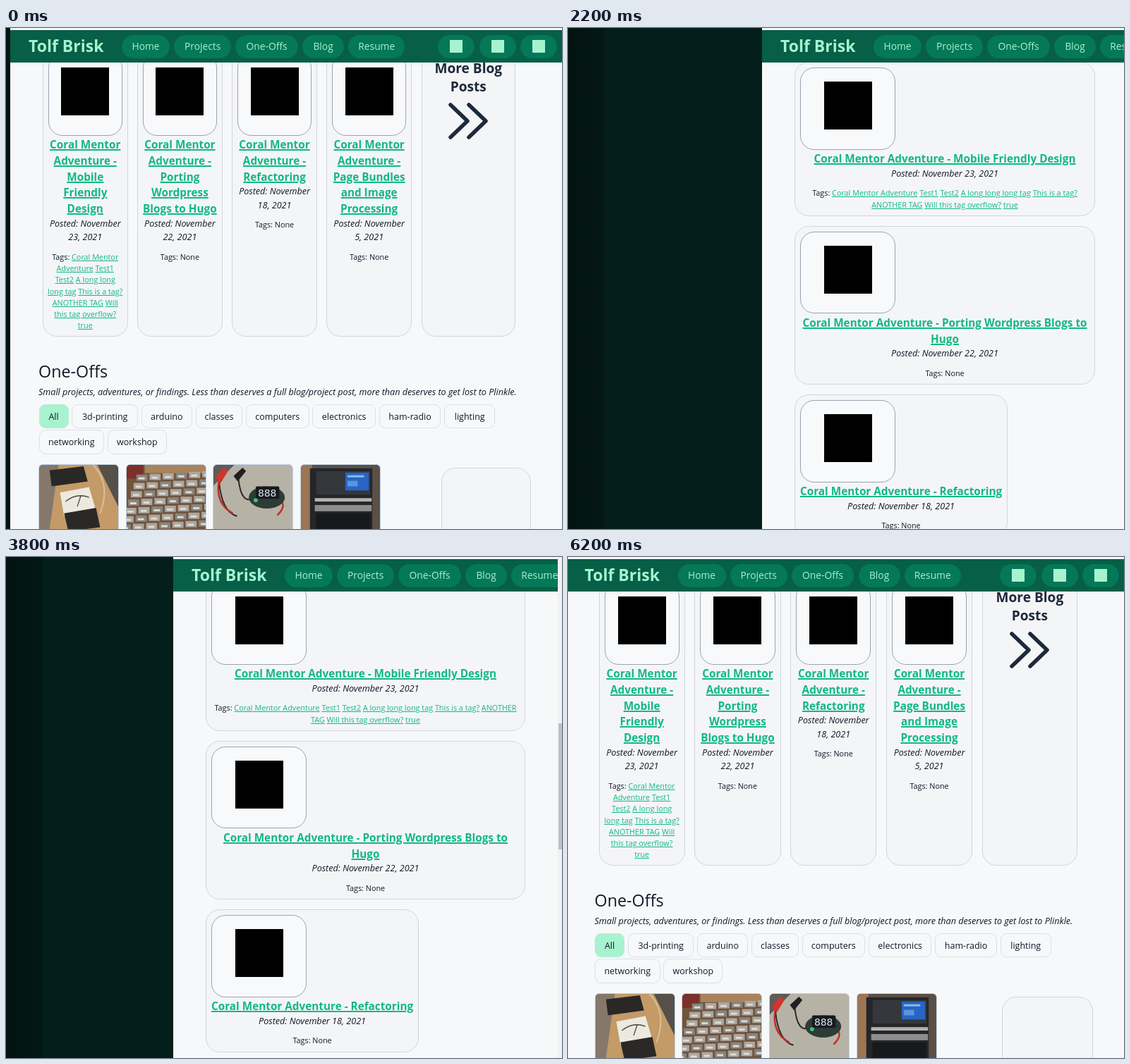
An HTML page for the animation above (6.6 s loop, 788 by 711 pixels).

```html
<!DOCTYPE html>
<html lang="en">
<head>
<meta charset="utf-8">
<title>Responsive page</title>
<style>
* { box-sizing: border-box; margin: 0; padding: 0; }
html, body { width: 100%; height: 100%; overflow: hidden; }
body { font-family: "Open Sans", "Noto Sans", sans-serif; color: #111827; }
#stage { position: relative; width: 788px; height: 711px; overflow: hidden;
  background: linear-gradient(90deg, #03130f 0, #031815 50px, #041f1b 54px); }
#page { position: absolute; top: 0; height: 711px; overflow: hidden; background: #f7f8fa; }
#bar { position: absolute; top: 0; width: 17px; height: 711px; background: #f1f1f1; }
#thumb { position: absolute; left: 1px; width: 15px; background: #c1c1c1; }

header { position: absolute; z-index: 2; top: 3px; left: 0; width: 100%; height: 46px;
  background: #065f46; color: #a7f3d0; }
header b { position: absolute; left: 26px; line-height: 45px; font-size: 23px; white-space: nowrap; }
nav, #icons { position: absolute; top: 7px; display: flex; }
nav { left: 158px; gap: 6.2px; }
nav span, #icons span { flex: none; height: 33px; border-radius: 17px; background: #047857;
  font-size: 13.8px; line-height: 32px; text-align: center; }
#icons { gap: 6.5px; }
#icons span { width: 52px; padding: 7px 17px; }
#icons i { display: block; width: 18px; height: 18px; background: #a7f3d0; }

main { position: absolute; left: 0; width: 100%; }
.cards { display: flex; gap: 13.6px; margin: 0 66px 0 46px; }
.card { flex: 1 1 40px; min-width: 0; padding: 7px; border: 1.3px solid #d1d5db; border-radius: 20px;
  background: #f4f5f7; text-align: center; }
.card:last-child { flex-basis: 53px; }
.pic { position: relative; height: 116.5px; margin-bottom: 1.5px; border: 1.3px solid #9ca3af;
  border-radius: 20px; background: #f8f9fb; overflow: hidden; }
.pic::after { content: ""; position: absolute; left: 50%; top: 19px; width: 68px; height: 68px;
  margin-left: -34px; background: #000; }
h3, .date, .tags { margin: 0 -1px; }
h3 { font-size: 15.3px; line-height: 22.8px; color: #10b981; text-decoration: underline;
  text-decoration-thickness: 1.5px; }
.date, .desc { font-size: 12.6px; line-height: 19.5px; font-style: italic; }
.tags { margin-top: 10px; font-size: 10.8px; line-height: 16.2px; }
.tags u { color: #10b981; }
.more { padding-top: 15px; font-size: 19.1px; line-height: 26px; font-weight: 700; color: #1e293b; }
.more svg { display: block; margin: 9px auto 0; }
.narrow .cards { flex-direction: column; align-items: flex-start; gap: 14px; margin-right: 46px; }
.narrow .card { flex: none; width: fit-content; max-width: 100%; }
.narrow .pic { width: 135px; }
.narrow h3 { margin: 0; }

section { position: relative; margin: 31px 40px 0; }
h2 { font-size: 23.3px; line-height: 37px; font-weight: 400; }
.desc { margin-top: 1px; }
.filters { display: flex; flex-wrap: wrap; gap: 2px 4.9px; margin: 7px 0 0 .5px; }
.filters span { height: 34.3px; border: 1px solid #dcdfe5; border-radius: 9px; font-size: 12.5px;
  line-height: 33px; text-align: center; }
.filters span:first-child { background: #a7f3d0; border-color: #b5ecd5; }
.shots { position: relative; display: flex; gap: 9.7px; margin-top: 14.5px; height: 114px; }
.shots svg { flex: none; border: 1.5px solid #bcd3e6; border-radius: 6px; }
#next { position: absolute; top: 5px; right: 4px; height: 160px; border: 1.3px solid #d1d5db;
  border-radius: 20px; background: #f4f5f7; }
</style>
</head>
<body>
<div id="stage">
  <div id="page">
    <header><b>Tolf Brisk</b><nav></nav>
      <div id="icons"><span><i></i></span><span><i></i></span><span><i></i></span></div>
    </header>
    <main>
      <div class="cards"></div>
      <section>
        <h2>One-Offs</h2>
        <p class="desc">Small projects, adventures, or findings. Less than deserves a full blog/project post, more than deserves to get lost to Plinkle.</p>
        <div class="filters"></div>
        <div class="shots"><div id="next"></div></div>
      </section>
    </main>
  </div>
  <div id="bar"><div id="thumb"></div></div>
</div>
<script>
const LOOP = 6600, STEP = 100;
const $ = s => document.querySelector(s);
const page = $('#page'), main = $('main'), icons = $('#icons'), bar = $('#bar'),
  thumb = $('#thumb'), next = $('#next');

// Static content
const boxes = list => list.map(([name, w]) => `<span style="width:${w}px">${name}</span>`).join('');
$('nav').innerHTML = boxes([['Home', 68], ['Projects', 81], ['One-Offs', 88.5], ['Blog', 59], ['Resume', 80]]);
$('.filters').innerHTML = boxes([['All', 42], ['3d-printing', 93.5], ['arduino', 72], ['classes', 66.5],
  ['computers', 89.5], ['electronics', 89.5], ['ham-radio', 87.5], ['lighting', 72],
  ['networking', 92.5], ['workshop', 84]]);

const SERIES = 'Coral Mentor Adventure';
const tags = [SERIES, 'Test1', 'Test2', 'A long long long tag', 'This is a tag?', 'ANOTHER TAG',
  'Will this tag overflow?', 'true'].map(s => `<u>${s}</u>`).join(' ');
const card = (title, day, list = 'None') => `<div class="card"><div class="pic"></div>
  <h3>${SERIES} - ${title}</h3><p class="date">Posted: November ${day}, 2021</p>
  <p class="tags">Tags: ${list}</p></div>`;
$('.cards').innerHTML = card('Mobile Friendly Design', 23, tags) +
  card('Porting Wordpress Blogs to Hugo', 22) + card('Refactoring', 18) +
  card('Page Bundles and Image Processing', 5) +
  `<div class="card more">More Blog Posts<svg width="58" height="54" fill="none" stroke="#1e293b"
  stroke-width="5.5" stroke-linecap="round" stroke-linejoin="round"><path d="M4 4L28 27L4 50M30 4L54 27L30 50"/></svg></div>`;

// Simplified photographs
const rect = (x, y, w, h, fill, extra = '') =>
  `<rect x="${x}" y="${y}" width="${w}" height="${h}" fill="${fill}" ${extra}/>`;
const line = (d, color, w) => `<path d="${d}" fill="none" stroke="${color}" stroke-width="${w}"/>`;
const poly = (points, fill) => `<polygon points="${points}" fill="${fill}"/>`;

function trays() {
  let out = '';
  for (let r = 0; r < 7; r++)
    for (let c = 0; c < 7; c++) {
      const x = c * 19 - r * 4 + 14, y = 14 + r * 12 - c;
      out += rect(x, y, 16, 9, (r + c) % 3 ? '#aaa7a0' : '#88857f') + rect(x + 3, y + 4, 9, 3, '#dedbd3');
    }
  return out;
}

const shots = [
  rect(0, 0, 114, 114, '#c49a67') + poly('0,0 28,0 12,114 0,114', '#85786a') +
    poly('84,0 114,0 114,60', '#55504a') + line('M78 0Q104 28 88 70', '#d8c09a', 2) +
    poly('15,8 64,2 70,24 18,31', '#292827') + poly('30,40 72,32 82,66 36,74', '#ece9df') +
    line('M38 53Q54 40 72 47M55 60L60 45', '#4a4946', 1.3) + poly('36,70 82,62 88,90 42,96', '#2b2927'),
  rect(0, 0, 114, 114, '#71543c') + rect(0, 0, 24, 20, '#7c302b') + rect(26, 0, 88, 12, '#a9835c') + trays(),
  rect(0, 0, 114, 114, '#b7b2a6') + poly('0,0 30,0 0,30', '#5d5c59') +
    line('M8 24Q12 68 34 74M36 20Q40 58 58 48', '#292929', 2) +
    line('M8 22Q2 56 28 70M84 44Q112 54 92 73', '#ba2e29', 2.5) +
    poly('3,18 14,4 21,9 10,27', '#cf352c') + poly('29,16 42,4 47,9 35,24', '#202020') +
    '<ellipse cx="77" cy="47" rx="26" ry="16" fill="#2d3c36"/>' + rect(61, 31, 34, 18, '#171b20', 'rx="2"') +
    '<text x="64" y="46" font-family="DejaVu Sans Mono, monospace" font-size="15" fill="#dce6e8">888</text>' +
    '<circle cx="61" cy="51" r="3" fill="#36c878"/>',
  rect(0, 0, 114, 114, '#5b5048') + rect(0, 0, 16, 114, '#9b7554') + rect(13, 5, 90, 109, '#242629') +
    rect(22, 9, 78, 34, '#34373b') + rect(64, 11, 34, 26, '#2864c4') + rect(67, 15, 24, 3, '#8eb7ed') +
    rect(67, 23, 15, 8, '#5b94df') + rect(20, 48, 82, 5, '#b3b2ad') + rect(20, 58, 82, 9, '#8c8e8f') +
    rect(22, 70, 78, 30, '#18191b')
];
$('.shots').insertAdjacentHTML('afterbegin',
  shots.map(s => `<svg width="114" height="114" viewBox="0 0 114 114">${s}</svg>`).join(''));

// Window edges over time: [ms, x]
const leftKeys = [[0, 6], [800, 6], [1000, 26], [1200, 80], [1400, 133], [1500, 152], [1800, 212],
  [2200, 275], [2500, 322], [2900, 367], [3100, 372], [3200, 368], [3400, 344], [3600, 297],
  [3800, 237], [4300, 92], [4500, 52], [4700, 24], [5000, 2], [5100, 2], [5200, -2.5]];
const rightKeys = [[0, 788], [800, 788], [1400, 800], [2200, 793], [2900, 791], [3600, 783],
  [3800, 782], [4500, 785], [5000, 788]];
const hoverKeys = [[5600, 0], [5800, 1], [6000, 1], [6200, 0]];

function at(keys, t) {
  const i = keys.findIndex(k => k[0] > t);
  if (i < 0) return keys[keys.length - 1][1];
  if (i === 0) return keys[0][1];
  const [t0, a] = keys[i - 1], [t1, b] = keys[i];
  return a + (b - a) * (t - t0) / (t1 - t0);
}

function draw(t) {
  const left = at(leftKeys, t), right = at(rightKeys, t), width = right - left;
  const narrow = width < 623;
  page.style.left = left + 'px';
  page.style.width = width + 'px';
  page.classList.toggle('narrow', narrow);
  main.style.top = (narrow && width < 530 ? 48 : 28) + 'px';
  icons.style.left = Math.max(565, width - 176) + 'px';
  next.style.width = width * 0.2 - 29.5 + 'px';
  bar.style.left = right + 'px';
  thumb.style.top = (narrow ? 236 : 287) + 'px';
  thumb.style.height = (narrow ? 179 : 235) + 'px';
  const h = at(hoverKeys, t);
  icons.lastElementChild.style.background = `rgb(${4 + h},${120 + 30 * h},${87 + 18 * h})`;
}

let last = -1;
function tick(now) {
  const t = Math.floor(now % LOOP / STEP) * STEP;
  if (t !== last) draw(last = t);
  requestAnimationFrame(tick);
}
draw(0);
requestAnimationFrame(tick);
</script>
</body>
</html>
```
